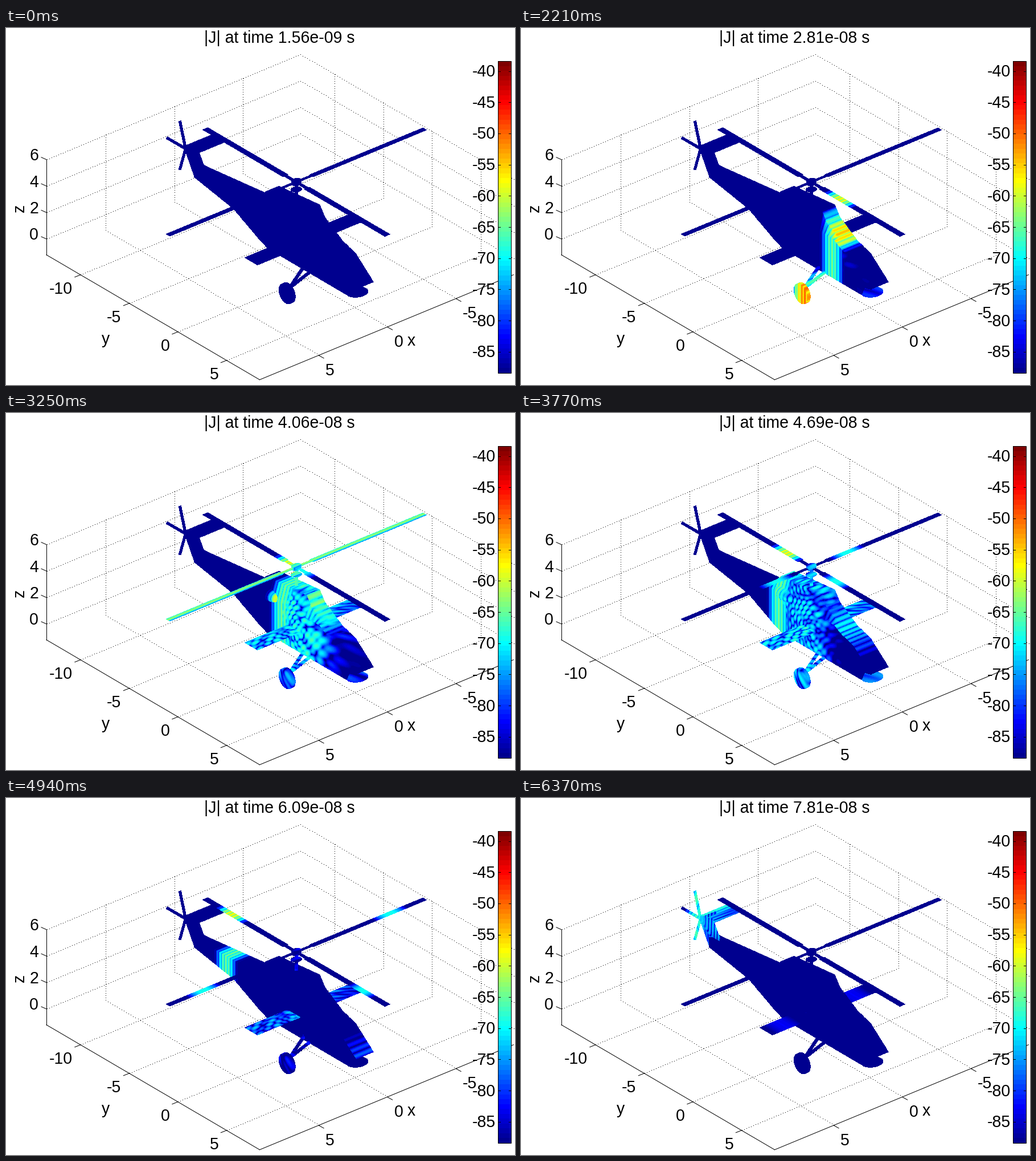
Write a matplotlib script that moves like this. It is 894 by 626 pixels and loops after 6500 ms.

```python
import numpy as np
import matplotlib.pyplot as plt
from matplotlib.animation import FuncAnimation

W, H = 894, 626
FRAMES, INTERVAL = 50, 130
STEP_NS = 1.5625
DB_MIN, DB_SPAN = -88.4, 50.0
PX = 0.72  # points per pixel at 100 dpi
VIEW = np.array([17.1, 24.1, 17.7])  # towards the viewer

ramp = np.arange(1, 65) / 64
JET = np.stack([np.clip(1.5 - np.abs(4 * ramp - k), 0, 1) for k in (3, 2, 1)], 1)

plt.rcParams["font.family"] = "Liberation Sans"
fig = plt.figure(figsize=(W / 100, H / 100), dpi=100, facecolor="white")
ax = fig.add_axes([0, 0, 1, 1])
ax.axis("off")


def project(x, y, z):
    """World metres to stage pixels."""
    return np.array([526 - 24.1 * x + 17.1 * y, 412.4 + 9.95 * x + 10 * y - 23.2 * z])


# --- axes box -------------------------------------------------------------
XL, XR, YL, YR, ZL, ZR = -9.2, 9.3, -13.5, 8.4, -1.2, 6
dots = []


def label(pos, text, ha="center", **kw):
    return ax.text(*pos, text, ha=ha, size=28.5 * PX, zorder=6, **kw)


def line(p, q):
    ax.plot(*zip(p, q), color="black", lw=PX, zorder=1)


def dotted(*corners):
    for p, q in zip(corners, corners[1:]):
        count = int(np.abs(q - p).max() / 4)
        dots.append(np.floor(np.linspace(p, q, count + 1)) + 0.5)


line(project(XR, YL, ZL), project(XR, YL, ZR))
line(project(XR, YL, ZL), project(XR, YR, ZL))
line(project(XR, YR, ZL), project(XL, YR, ZL))

for x in (5, 0, -5):
    axis = project(x, YR, ZL)
    dotted(project(x, YL, ZR), project(x, YL, ZL), axis)
    line(axis, axis + (9, 5))
    label(axis + (12, 35), str(x), "left")

for y in (-10, -5, 0, 5):
    axis = project(XR, y, ZL)
    dotted(axis, project(XL, y, ZL), project(XL, y, ZR))
    line(axis, axis + (-10, 4))
    label(axis + (-14, 33), str(y), "right")

for z in (0, 2, 4, 6):
    axis = project(XR, YL, z)
    dotted(axis, project(XL, YL, z), project(XL, YR, z))
    line(axis, axis + (-9, -4))
    label(axis + (-14, 1.5), str(z), "right")

ax.plot(*np.concatenate(dots).T, ",", color="black", zorder=1)
label((175, 554), "y")
label((712, 557), "x")
label((24, 316), "z", rotation=90, va="center")
title = label((480.5, 26), "")

# --- colour bar -----------------------------------------------------------
ax.imshow(JET[::-1, None, :], extent=(864, 887, 605, 58), aspect="auto",
          interpolation="nearest", zorder=4)
ax.add_patch(plt.Rectangle((864, 58), 23, 547, fill=False, lw=PX, zorder=5))
for db in range(-85, -39, 5):
    y = 605 - (db - DB_MIN) / DB_SPAN * 547
    label((860, y + 9.5), str(db), "right")
    for x in (864, 883):
        ax.plot((x, x + 4), (y, y), color="black", lw=PX, zorder=5)

# --- helicopter as sampled surfaces ---------------------------------------
# per material: direct level, then trail level, peak time, duration, fade per metre
MATERIALS = {
    "body": (-64, -71, 41, 11, 5),
    "blade": (-57, -120, 41, 11, 0),
    "wing": (-66, -71, 46, 22, 0),
    "wheel": (-50, -73, 48, 12, 0),
    "tail": (-66, -72, 79, 7, 0),
    "trim": (-60, -73, 41, 18, 0),
}
NAMES = list(MATERIALS)
samples = []


def sheet(grid, material):
    """Add a surface given as a grid of world points, with its normals."""
    normal = np.cross(np.gradient(grid, axis=0), np.gradient(grid, axis=1))
    normal /= np.linalg.norm(normal, axis=-1, keepdims=True) + 1e-12
    normal *= np.where(normal @ VIEW < 0, -1, 1)[..., None]
    kind = np.full(grid.shape[:2] + (1,), NAMES.index(material))
    samples.append(np.concatenate([grid, normal, kind], -1).reshape(-1, 7))


def plate(a, b, c, d, material):
    a, b, c, d = (np.array(p, float) for p in (a, b, c, d))
    nu = int(np.linalg.norm(b - a) * 60) + 4
    nv = int(np.linalg.norm(d - a) * 60) + 4
    u = np.linspace(0, 1, nu)[:, None, None]
    v = np.linspace(0, 1, nv)[None, :, None]
    sheet((1 - v) * ((1 - u) * a + u * b) + v * ((1 - u) * d + u * c), material)


def rod(p, q, width, material):
    p, q = np.array(p, float), np.array(q, float)
    side = np.cross(q - p, VIEW)
    side *= width / 2 / np.linalg.norm(side)
    plate(p - side, q - side, q + side, p + side, material)


def disc(centre, r, e1, e2, material):
    rho = np.linspace(0.01, r, int(r * 60) + 4)[:, None, None]
    a = np.linspace(0, 2 * np.pi, int(r * 400))[None, :, None]
    sheet(centre + rho * (np.cos(a) * e1 + np.sin(a) * e2), material)


EX, EY, EZ = np.eye(3)
HUB = np.array([0, -0.94, 5.73])
TAIL_HUB = np.array([0.15, -12.1, 3.5])


def fuselage():
    y = np.linspace(-11, 6.1, 900)
    width = np.interp(y, (-11, -4), (0.3, 0.62))
    floor = np.interp(y, (-11, -6.7, -3, 5.1, 5.4, 6.1), (1.9, 1.45, 0.1, 0.08, 0.75, 0.9))
    roof = np.interp(y, (-10.4, -4.7, -3.6, 0.6, 1.1, 2.9, 4.3, 6.1),
                     (2.6, 2.95, 4.0, 4.4, 3.7, 2.7, 2.3, 0.95))
    shoulder = np.minimum(roof, 3)
    section = [(width, floor), (width, shoulder), (width / 2, roof), (-width, roof)]
    v = np.linspace(0, 1, 180)
    for (xa, za), (xb, zb) in zip(section, section[1:]):
        xs = xa[:, None] + (xb - xa)[:, None] * v
        zs = za[:, None] + (zb - za)[:, None] * v
        sheet(np.stack([xs, np.broadcast_to(y[:, None], xs.shape), zs], -1), "body")


def engine(centre, size):
    a = np.linspace(0, 2 * np.pi, 200)[:, None]
    b = np.linspace(0, np.pi, 120)[None, :]
    ball = np.stack([np.cos(a) * np.sin(b), np.cos(b) + 0 * a, np.sin(a) * np.sin(b)], -1)
    sheet(centre + ball * size, "body")


def main_rotor():
    for direction in (EX, EY, -EX, -EY):
        chord = np.cross(EZ, direction)
        for r0, r1, c in ((0.2, 1.1, 0.2), (1.1, 9.35, 0.36)):
            p, q, half = HUB + r0 * direction, HUB + r1 * direction, chord * c / 2
            plate(p - half, q - half, q + half, p + half, "blade")
    for h in np.linspace(-0.1, 0.1, 10):
        disc(HUB + h * EZ, 0.3, EX, EY, "trim")
    disc(HUB - 0.56 * EZ, 0.32, EX, EY, "trim")
    rod(HUB, HUB - 1.4 * EZ, 0.17, "trim")


def tail():
    x = 0.12
    plate((x, -11.2, 1.7), (x, -12.35, 3.6), (x, -10.9, 4.0), (x, -10.1, 2.75), "tail")
    plate((0, -12.35, 3.55), (-2, -12.35, 3.55), (-2, -11.05, 3.55), (0, -11.05, 3.55), "tail")
    for k in range(5):
        a = np.radians(108 + 72 * k)
        rod(TAIL_HUB, TAIL_HUB + 1.93 * (np.cos(a) * EY + np.sin(a) * EZ), 0.14, "tail")
    disc(TAIL_HUB, 0.2, EY, EZ, "tail")


def landing_gear():
    for x in np.linspace(2.4, 2.6, 10):
        disc(np.array([x, 1.64, -0.49]), 0.7, EY, EZ, "wheel")
    for y, z in ((0.76, 0.4), (1.35, 0.2)):
        rod((2.3, 1.6, -0.2), (0.62, y, z), 0.18, "trim")


fuselage()
engine((0.55, -2.9, 3.05), (0.35, 0.9, 0.4))
main_rotor()
tail()
landing_gear()
plate((-3.75, -0.94, 1.63), (3.75, -0.94, 1.63), (3.75, 0.36, 1.63), (-3.75, 0.36, 1.63), "wing")
disc(np.array([0, 5.3, 0.1]), 0.65, EX, EY, "trim")

# nearest sample wins each pixel
cloud = np.concatenate(samples)
cloud = cloud[np.argsort(cloud[:, :3] @ VIEW, kind="stable")]
col, row = np.floor(project(*cloud[:, :3].T)).astype(int)
owner = np.full((H, W), -1)
owner[row, col] = np.arange(len(cloud))
visible = owner >= 0
x, y, z, _, facing, upward, kind = cloud[owner[visible]].T
kind = kind.astype(int)
direct, trail_db, trail_time, trail_len, fade = np.array(list(MATERIALS.values()), float)[kind].T
is_body, is_blade, is_wing = (kind == NAMES.index(n) for n in ("body", "blade", "wing"))
facing = np.maximum(facing, 0)
direct = np.where(is_body, np.minimum(direct + 20 * facing, -50), direct)
hub_range = np.hypot(x, y - HUB[1])

# scatterers: rotor, engine, wing roots, gear and nose
rng = np.random.default_rng(4)
spots = np.array([(0, -1, 4.5), (0.9, -2.5, 3), (0.8, 0, 1.6), (-0.8, 0, 1.6), (2.4, 1.6, 0)])
ranges = [np.sqrt((x - a) ** 2 + (y - b) ** 2 + (z - c) ** 2) for a, b, c in spots]
phases = rng.uniform(0, 2 * np.pi, len(spots))


def ripple(distance, period, depth):
    return 20 * np.log10(depth + (1 - depth) * np.abs(np.cos(np.pi * distance / period)))


def interference(t):
    k = 10.5
    total = 0.7 * np.exp(1j * k * (y + 0.03 * t))
    for r, phase in zip(ranges, phases):
        total = total + np.exp(1j * (k * r - 0.3 * t + phase)) / (0.8 + 0.35 * r)
    return 20 * np.log10(np.abs(total) / 2 + 0.08)


def field(t):
    """Surface current in dB at time t (ns)."""
    d = y - (10.31 - 0.2924 * t)
    pulse = direct - 14.6 * d ** 2 + ripple(d, 0.32, 0.35)

    trail = (trail_db - 10 * ((t - trail_time) / trail_len) ** 2 + interference(t)
             - 25 * np.maximum(0, -d) - fade * np.maximum(0, d - 4))

    front = 0.3 + 0.257 * (t - 37)
    echo = (np.where(is_body & (upward > 0.3) & (t > 34), -68.0, -200) + 8 * facing
            - 0.6 * abs(t - 38) - 3.5 * (y - front) ** 2 + ripple(y, 0.35, 0.25))

    ring = np.where(is_blade & (t > 38), -69.0, -200) - 14 * (hub_range - 0.3 * (t - 38.3)) ** 2
    late = np.where(is_wing, -83.0, -200) + 0.8 * (t - 78) - 6 * (np.abs(x) - 2.6) ** 2
    return np.maximum.reduce([pulse, trail, echo, ring, late])


rgba = np.zeros((H, W, 4))
rgba[..., 3] = visible
picture = ax.imshow(rgba, extent=(0, W, H, 0), aspect="auto",
                    interpolation="nearest", zorder=3)
ax.set(xlim=(0, W), ylim=(H, 0))


def update(n):
    t = (n + 1) * STEP_NS
    index = np.clip((field(t) - DB_MIN) / DB_SPAN * 64, 0, 63).astype(int)
    rgba[visible, :3] = JET[index]
    picture.set_data(rgba)
    title.set_text(f"|J| at time {t * 1e-9:.3g} s")
    return picture, title


anim = FuncAnimation(fig, update, frames=FRAMES, interval=INTERVAL, repeat=True,
                     repeat_delay=0, blit=False)
plt.show()
```
